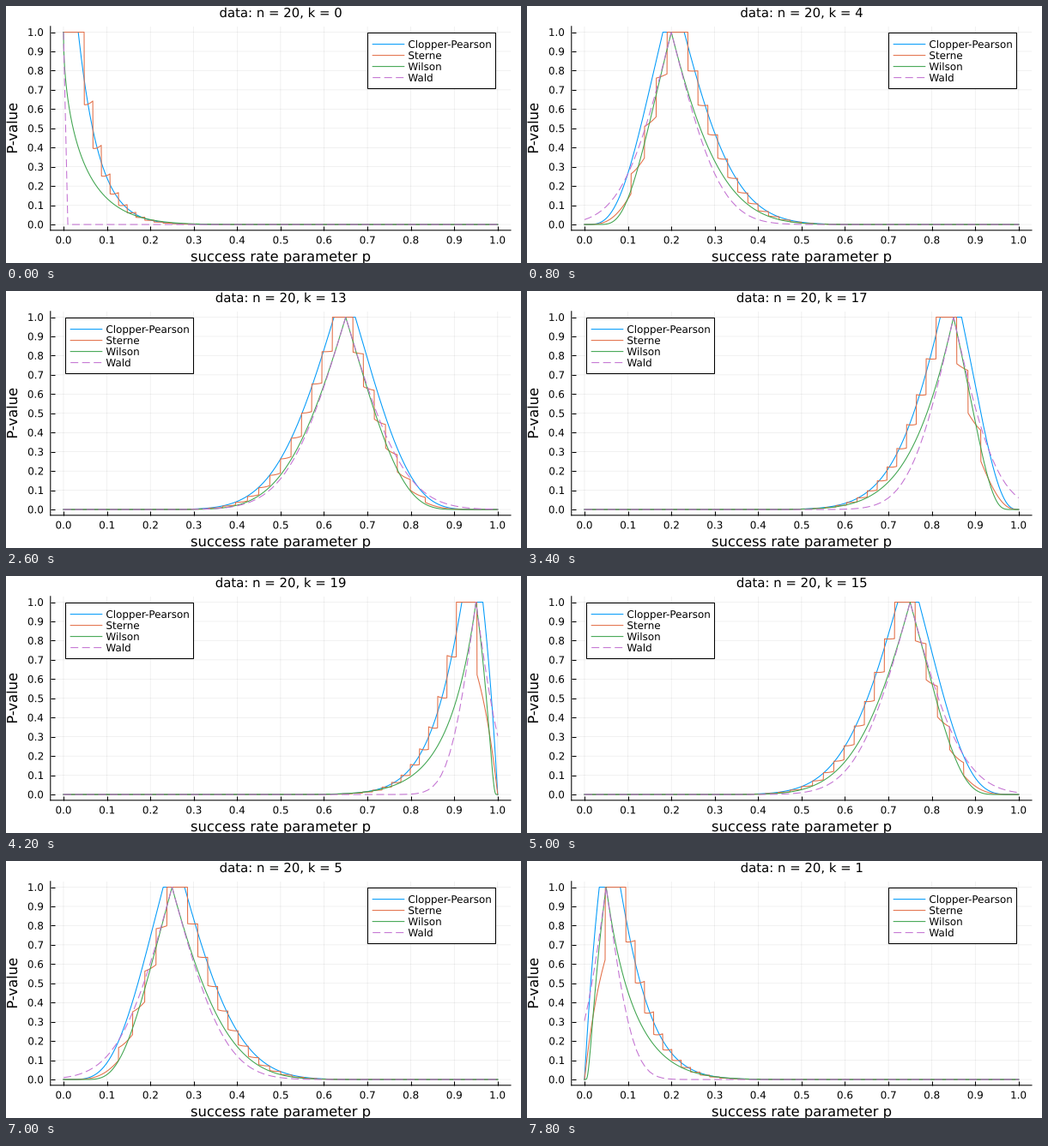
Animation of 600 by 300 pixels, one loop 8000 ms. Source, as a matplotlib script:

```python
import math

import matplotlib.pyplot as plt
import numpy as np
from matplotlib.animation import FuncAnimation
from matplotlib.patches import PathPatch, Rectangle
from matplotlib.textpath import TextPath
from matplotlib.transforms import Affine2D

W, H, DPI = 600, 300, 72  # at 72 dpi a point is a pixel
N = 20
STEP_MS = 200
LEFT, RIGHT, TOP, BOTTOM = 51.8, 588, 23.8, 261.8
TICK_SIZE, TITLE_SIZE, LABEL_SIZE = 11.95, 14.9, 16.4
LINE = 1.05
DASH = (0, (9, 4.5))
STYLES = [
    ("Clopper-Pearson", "#009afa", "-"),
    ("Sterne", "#e36f47", "-"),
    ("Wilson", "#3ea44e", "-"),
    ("Wald", "#c371d2", DASH),
]

plt.rcParams.update({
    "font.family": "DejaVu Sans",
    "lines.scale_dashes": False,
    "path.snap": False,
    "toolbar": "None",
})

fine = np.linspace(0, 1, 2001)
coarse = np.linspace(0, 1, 101)
j = np.arange(N + 1)[:, None]
comb = np.array([math.comb(N, i) for i in range(N + 1)])[:, None]
pmf = comb * fine**j * (1 - fine)**(N - j)
erfc = np.vectorize(math.erfc)


def clopper_pearson(k):
    lower, upper = pmf[:k + 1].sum(axis=0), pmf[k:].sum(axis=0)
    return np.minimum(1, 2 * np.minimum(lower, upper))


def sterne(k):
    rare = pmf <= pmf[k] * (1 + 1e-9)
    return np.minimum(1, (pmf * rare).sum(axis=0))


def normal_pvalue(diff, variance):
    z = np.abs(diff) / np.sqrt(np.maximum(variance, 1e-12))
    return erfc(z / math.sqrt(2))


def wilson(k):
    return normal_pvalue(k - N * fine, N * fine * (1 - fine))


def wald(k):
    return normal_pvalue(k - N * coarse, k * (1 - k / N))


fig = plt.figure(figsize=(W / DPI, H / DPI), dpi=DPI, facecolor="white")
ax = fig.add_axes([LEFT / W, 1 - BOTTOM / H, (RIGHT - LEFT) / W, (BOTTOM - TOP) / H])
ax.set(xlim=(-0.03, 1.03), ylim=(-0.03, 1.03))
ticks = np.arange(11) / 10
ax.set_xticks(ticks, [""] * 11)
ax.set_yticks(ticks, [""] * 11)
ax.tick_params(direction="in", length=5, width=LINE)
ax.grid(color="black", alpha=0.1, linewidth=0.55)
ax.set_axisbelow(True)
ax.spines[["top", "right"]].set_visible(False)
for side in ("left", "bottom"):
    ax.spines[side].set_linewidth(LINE)

# Overlay in pixel coordinates, y pointing down
page = fig.add_axes([0, 0, 1, 1])
page.set(xlim=(0, W), ylim=(H, 0))
page.axis("off")


def outline(x, y, text, size, align="center", angle=0):
    """Glyph outlines placed without rounding to whole pixels."""
    path = TextPath((0, 0), text, size=size)
    box = path.get_extents()
    shift = {"left": 0, "center": (box.x0 + box.x1) / 2, "right": box.x1}[align]
    place = Affine2D().translate(-shift, 0).scale(1, -1).rotate_deg(-angle).translate(x, y)
    return place.transform_path(path)


def label(*args, **kw):
    return page.add_patch(PathPatch(outline(*args, **kw), fc="black", lw=0))


def to_pixel(t, start, end):
    return start + (end - start) * (t + 0.03) / 1.06


for t in ticks:
    label(to_pixel(t, LEFT, RIGHT), 277.4, f"{t:.1f}", TICK_SIZE)
    label(43.1, to_pixel(t, BOTTOM, TOP) + 4.35, f"{t:.1f}", TICK_SIZE, align="right")
title = label(320, 13, "data", TITLE_SIZE)
label(320, 298, "success rate parameter p", LABEL_SIZE)
label(13, 142.4, "P-value", LABEL_SIZE, angle=90)

curves = [ax.plot([], [], color=c, ls=ls, lw=LINE)[0] for _, c, ls in STYLES]


def make_legend(x):
    parts = [page.add_patch(Rectangle((x, 31.5), 149, 65, fc="white", ec="black", lw=LINE))]
    for row, (name, color, ls) in enumerate(STYLES):
        y = 44.6 + 13 * row
        parts += page.plot([x + 5.7, x + 42.3], [y, y], color=color, ls=ls, lw=LINE)
        parts.append(label(x + 46.9, y + 4.3, name, TICK_SIZE, align="left"))
    return parts


legend_left, legend_right = make_legend(69.5), make_legend(421.5)


def update(frame):
    k = N - abs(N - frame)
    title.set_path(outline(320, 13, f"data: n = {N}, k = {k}", TITLE_SIZE))
    for curve, pvalue in zip(curves, (clopper_pearson, sterne, wilson, wald)):
        curve.set_data(coarse if pvalue is wald else fine, pvalue(k))
    for part in legend_left:
        part.set_visible(k > N // 2)
    for part in legend_right:
        part.set_visible(k <= N // 2)
    return [title, *curves, *legend_left, *legend_right]


anim = FuncAnimation(fig, update, frames=2 * N, interval=STEP_MS, repeat=True, repeat_delay=0)
plt.show()
```
